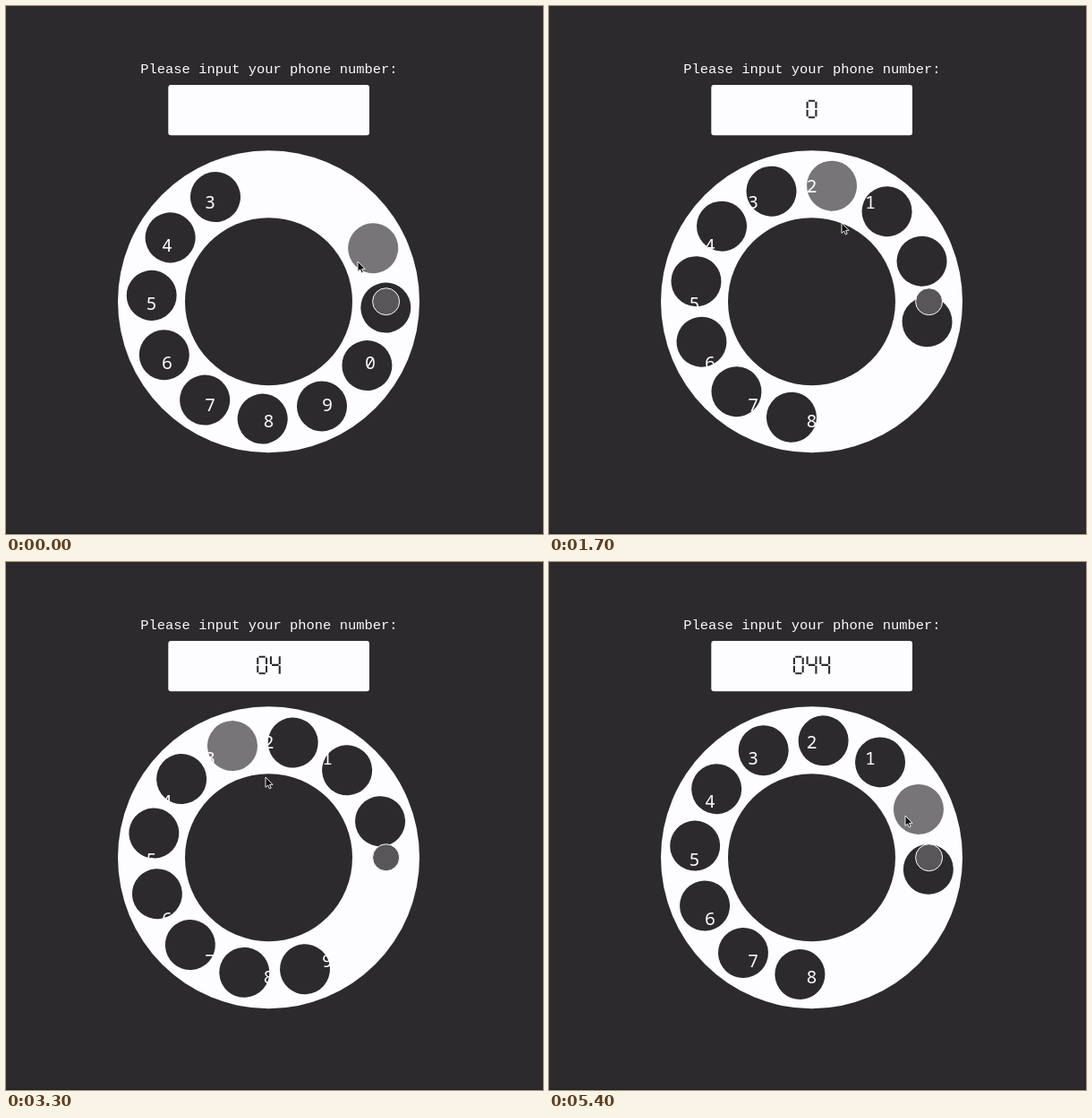
An HTML page for the animation above (5.5 s loop, 600 by 589 pixels).

```html
<!DOCTYPE html>
<html lang="en">
<head>
<meta charset="utf-8">
<title>Rotary input</title>
<style>
  html, body { margin: 0; width: 100%; height: 100%; overflow: hidden; background: #2c2a2c; }
  svg { display: block; width: 600px; height: 589px; }
  text { fill: #fdfcfe; text-anchor: middle; }
  .title { font: 15.45px "Liberation Mono", monospace; }
  .label { font: 300 20px "Noto Sans Mono", monospace; }
  .paper { fill: #fdfcfe; }
  .hole { fill: #2c2a2c; }
  .hole.held { fill: #777577; }
  .stop { fill: #585658; stroke: #fdfcfe; }
  .seg { fill: none; stroke: #2c2a2c; stroke-width: 2.1; }
  .arrow { fill: #0b0b0b; stroke: #fff; stroke-width: .9; stroke-linejoin: round; }
</style>
</head>
<body>
<svg viewBox="0 0 600 589">
  <rect y="588" width="600" height="1" fill="#201f20"/>
  <text class="title" x="293.9" y="75">Please input your phone number:</text>
  <rect class="paper" x="181.3" y="88" width="224.7" height="56.2" rx="3"/>
  <g id="display"></g>
  <circle class="paper" cx="293.5" cy="329.7" r="168.5"/>
  <circle class="hole" cx="293.5" cy="329.7" r="93.5"/>
  <g id="dial"></g>
  <g id="labels"></g>
  <circle class="stop" cx="424.6" cy="329.7" r="15"/>
  <path id="pointer" class="arrow" d="M0 0V11.4L2.6 9L4.3 12.9L6.2 12.1L4.6 8.3H8.1Z"/>
</svg>
<script>
const LOOP = 5500, STEP = 100, RETURN = 290;
const CX = 293.5, CY = 329.7, RING = 131;
const $ = id => document.getElementById(id);

function add(parent, tag, attrs, text = "") {
  const el = document.createElementNS("http://www.w3.org/2000/svg", tag);
  for (const key in attrs) el.setAttribute(key, attrs[key]);
  el.textContent = text;
  return parent.appendChild(el);
}

// Degrees from a digit's hole clockwise to the stop
const turn = digit => 30 * ((digit || 10) + 1);

const holes = [];
for (let digit = 0; digit < 10; digit++) {
  const a = -turn(digit) * Math.PI / 180;
  const x = CX + RING * Math.cos(a), y = CY + RING * Math.sin(a);
  holes[digit] = add($("dial"), "circle", { class: "hole", cx: x, cy: y, r: 28 });
  add($("labels"), "text", { class: "label", x, y: y + 9.3 }, digit);
}

// The first drag began before the loop; the last one is cut off by its end.
const calls = [
  { digit: 0, press: -1500, drag: -1380, drop: 350 },
  { digit: 4, press: 1300, drag: 1420, drop: 2000 },
  { digit: 4, press: 2900, drag: 3092, drop: 3648 },
  { digit: 2, press: 5000, drag: 5150, drop: 5545 }
];

const easeInOut = x => x < .5 ? 2 * x * x : 1 - 2 * (1 - x) ** 2;

// cubic-bezier(.25, .1, .25, 1)
function ease(x) {
  const curve = (u, p, q) => 3 * u * (1 - u) ** 2 * p + 3 * u * u * (1 - u) * q + u ** 3;
  let lo = 0, hi = 1;
  for (let i = 0; i < 24; i++) {
    const mid = (lo + hi) / 2;
    if (curve(mid, .25, .25) < x) lo = mid; else hi = mid;
  }
  return curve(lo, .1, 1);
}

function dialAngle({ digit, drag, drop }, t) {
  const part = t < drop
    ? easeInOut(Math.max(0, (t - drag) / (drop - drag)))
    : 1 - ease((t - drop) / RETURN);
  return turn(digit) * part;
}

// Pointer tip [time, x, y], joined by a smooth curve; equal neighbours are rests
const path = [
  [0, 393, 285], [300, 437, 335], [600, 437, 343], [700, 416, 347],
  [1200, 202, 261], [1400, 202, 261], [1700, 327, 242], [2000, 452, 338],
  [2600, 246, 273], [2800, 203, 262], [3000, 203, 262], [3300, 290, 240],
  [3650, 452, 335], [3800, 425, 346], [4200, 425, 346], [4600, 325, 160],
  [4800, 291, 210], [5100, 291, 210], [5400, 398, 283]
];

function slope(i, n) {
  const a = path[i - 1], b = path[i], c = path[i + 1];
  if (!a || !c || a[n] === b[n] || b[n] === c[n]) return 0;
  return (c[n] - a[n]) / (c[0] - a[0]);
}

function pointerAt(t) {
  const next = path.findIndex(k => k[0] > t);
  if (next < 0) return path[path.length - 1].slice(1);
  const a = path[next - 1], b = path[next];
  const span = b[0] - a[0], p = (t - a[0]) / span, q = 1 - p;
  return [1, 2].map(n =>
    q * q * (1 + 2 * p) * a[n] + p * p * (1 + 2 * q) * b[n] +
    span * p * q * (q * slope(next - 1, n) - p * slope(next, n)));
}

const glyphs = {
  0: "M2.2 .9H9.4M.9 2V9.2M10.7 2V9.2M.9 11V18.4M10.7 11V18.4M2.2 19.5H9.4",
  4: "M.9 .5V9.2M10.7 .5V9.2M2 10.1H9.6M10.7 11V20"
};
let shown = "";

function show(value) {
  if (value === shown) return;
  shown = value;
  $("display").replaceChildren();
  [...value].forEach((d, i) => {
    const x = CX - 5.8 + (i - (value.length - 1) / 2) * 14.7;
    add($("display"), "path", { class: "seg", d: glyphs[d], transform: `translate(${x} 104.8)` });
  });
}

function draw(t) {
  const call = calls.find(c => t >= c.press && t < c.drop + RETURN);
  const angle = call ? dialAngle(call, t) : 0;
  $("dial").setAttribute("transform", `rotate(${angle} ${CX} ${CY})`);
  holes.forEach((h, digit) => h.classList.toggle("held", call?.digit === digit));
  show(calls.filter(c => t > c.drop).map(c => c.digit).join(""));
  $("pointer").setAttribute("transform", `translate(${pointerAt(t)})`);
}

const start = performance.now();
function tick() {
  const t = (performance.now() - start) % LOOP;
  draw(Math.floor(t / STEP) * STEP);
  requestAnimationFrame(tick);
}
tick();
</script>
</body>
</html>
```
